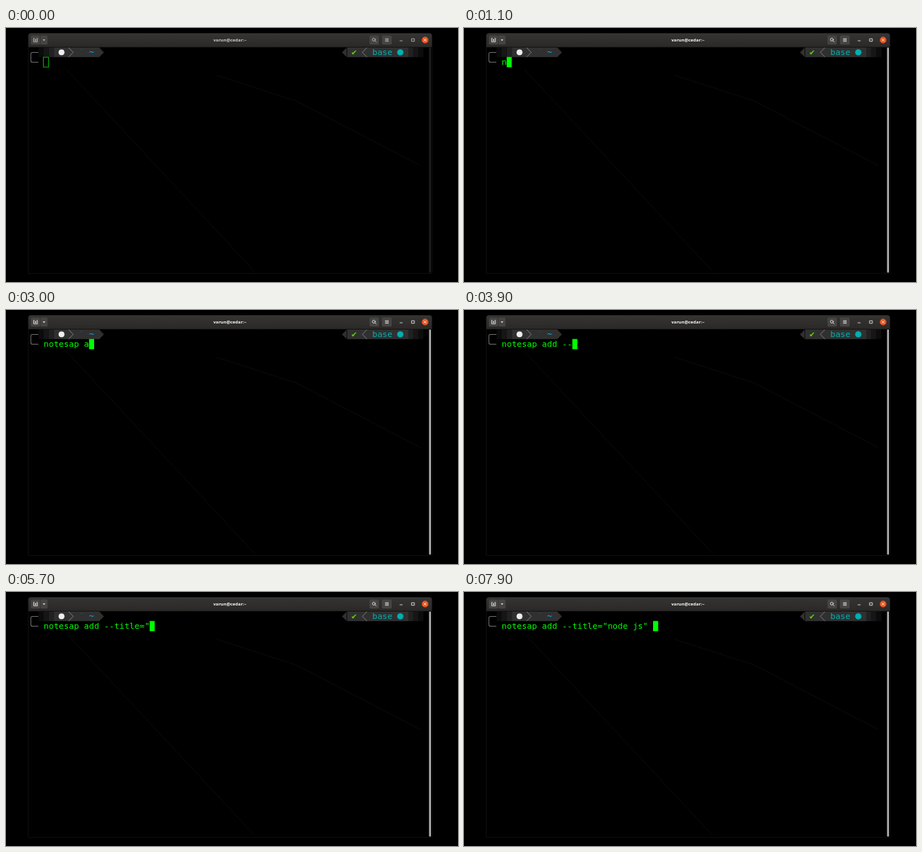
These frames come from a looping animation (600 by 338 pixels, 8 s). An HTML page:

```html
<!DOCTYPE html>
<html lang="en">
<head>
<meta charset="utf-8">
<title>Terminal</title>
<style>
  html, body { margin: 0; width: 100%; height: 100%; overflow: hidden; background: #000; }
  svg { display: block; width: 600px; height: 338px; }
  .mono { font: 11.13px "DejaVu Sans Mono", monospace; white-space: pre; }
  .title { font: bold 5.9px "Open Sans", "Noto Sans", sans-serif; }
  .line { fill: none; stroke-linecap: round; stroke-linejoin: round; }
</style>
</head>
<body>
<svg viewBox="0 0 600 338">
  <defs>
    <linearGradient id="bar" x2="0" y2="1">
      <stop stop-color="#353433"/>
      <stop offset="1" stop-color="#2a2928"/>
    </linearGradient>
  </defs>
  <rect width="600" height="338"/>

  <!-- window edge and faint backdrop lines -->
  <path class="line" d="M29.5 26V326.5H565.5V26" stroke="#0d0d0d"/>
  <path class="line" d="M80 55L200 184L330 324M280 63L385 97L550 183" stroke="#0b0b0b"/>

  <!-- header bar -->
  <path d="M29.5 25.5V10.5Q29.5 7 33 7H562Q565.5 7 565.5 10.5V25.5Z" fill="url(#bar)"/>
  <g fill="#454443">
    <rect x="33" y="10" width="12" height="12" rx="1.5"/>
    <rect x="45.6" y="10" width="9.6" height="12" rx="1.5"/>
    <rect x="482.5" y="10" width="12.5" height="12" rx="1.5"/>
    <rect x="499" y="10" width="13" height="12" rx="1.5"/>
  </g>
  <g id="icons" stroke="#eee" stroke-width=".8" class="line">
    <path d="M37.6 13.8H36.7V18.4H41.7V13.8H40.8M39.2 15V17.2M38.1 16.1H40.3"/>
    <path d="M48.8 15.2H52.2L50.5 17.3Z" fill="#eee" stroke="none"/>
    <circle cx="488.3" cy="15.5" r="1.9"/>
    <path d="M489.8 17L491.3 18.5"/>
    <path d="M503.6 14.3H507.6M503.6 16H507.6M503.6 17.7H507.6"/>
    <path d="M523 17H526"/>
    <rect x="538.7" y="14.3" width="3.4" height="3.4"/>
  </g>
  <circle cx="556.3" cy="16" r="4.4" fill="#e95420"/>
  <path class="line" d="M554.8 14.5L557.8 17.5M557.8 14.5L554.8 17.5" stroke="#fff" stroke-width=".8"/>
  <text id="title" class="title" x="297.3" y="18" text-anchor="middle">varun@cedar:~</text>

  <!-- prompt -->
  <path class="line" d="M42.5 32.5H35Q33 32.5 33 34.5V43.5Q33 45.5 35 45.5H42.5" stroke="#686868" stroke-width="1.1"/>
  <g id="fades"></g>
  <path d="M63.4 26H123.8L130 32.4L123.8 38.8H63.4Z" fill="#303030"/>
  <circle cx="73.7" cy="32.3" r="3.9" fill="#eee"/>
  <path class="line" d="M83.5 26.5L89.2 32.4L83.5 38.3" stroke="#808080" stroke-width=".9"/>
  <path class="line" d="M98.8 29L100.2 28L101.6 29" stroke="#17516a" stroke-width=".8"/>
  <text class="mono" x="110.2" y="36.2" fill="#00afff" font-weight="bold">~</text>

  <path d="M452.3 26V38.8L446 32.4Z" fill="#303030"/>
  <rect x="453" y="26" width="81" height="12.8" fill="#303030"/>
  <text class="mono" x="458.8" y="36.2" fill="#5fd700">✔</text>
  <path class="line" d="M478.8 26.5L473 32.4L478.8 38.3" stroke="#808080" stroke-width=".9"/>
  <text class="mono" x="486.2" y="36.2" fill="#00afaf">base</text>
  <circle cx="523.4" cy="32.4" r="4.2" fill="#00afaf"/>

  <!-- command line -->
  <text id="cmd" class="mono" x="50" y="49.3" fill="#0f0"></text>
  <rect id="cursor" y="39" height="13"/>
  <rect id="scroll" x="561.6" y="26" width="2.5" height="299.5" rx=".8"/>
</svg>
<script>
const LOOP = 8000, CELL = 6.7, LEFT = 50, FOCUS = 100, FADE = 200, BLINK = 600;
const $ = id => document.getElementById(id);

// [time, keys]; "<" deletes one character
const keys = [
  [1000, "n"], [1200, "o"], [1300, "t"], [1500, "e"], [1600, "s"], [1700, "a"],
  [1900, "p"], [2000, "p"], [2500, "<"], [2600, " "],
  [3000, "a"], [3200, "d"], [3400, "d"], [3500, " "], [3700, "-"], [3900, "-"],
  [4000, "t"], [4100, "i"], [4300, "t"], [4400, "le"], [5200, "="], [5700, "\""],
  [6000, "n"], [6100, "o"], [6500, "d"], [6700, "e "],
  [6900, "j"], [7100, "s"], [7700, "\""], [7900, " "]
];

function addFade(x, shade) {
  const r = document.createElementNS("http://www.w3.org/2000/svg", "rect");
  const box = { x, y: 26, width: CELL, height: 12.8, fill: `rgb(${shade},${shade},${shade})` };
  for (const k in box) r.setAttribute(k, box[k]);
  $("fades").append(r);
}
[12, 22, 33].forEach((shade, i) => {
  addFade(43.3 + i * CELL, shade);
  addFade(547.4 - i * CELL, shade);
});

function set(id, attrs) {
  for (const k in attrs) $(id).setAttribute(k, attrs[k]);
}

const gray = (from, to, p) => {
  const v = Math.round(from + (to - from) * p);
  return `rgb(${v},${v},${v})`;
};

function typed(t) {
  let text = "", last = -1;
  for (const [time, str] of keys) {
    if (time > t) break;
    text = str === "<" ? text.slice(0, -1) : text + str;
    last = time;
  }
  return { text, last };
}

function draw(t) {
  const { text, last } = typed(t);
  const focused = t >= FOCUS;
  const p = Math.min(1, Math.max(0, (t - FOCUS + 60) / FADE));
  const x = LEFT + text.length * CELL;
  const lit = last < 0 || (t - last) % (2 * BLINK) < BLINK;

  $("cmd").textContent = text;
  if (focused) {
    set("cursor", { x, y: 38.6, width: CELL, height: 13.6, fill: lit ? "#0f0" : "none", stroke: "none" });
  } else {
    set("cursor", { x: x - .4, y: 39, width: CELL + .3, height: 13, fill: "none", stroke: "#00b400" });
  }
  set("title", { fill: gray(200, 245, p) });
  set("icons", { opacity: .75 + .25 * p });
  set("scroll", { fill: gray(30, 178, p) });
}

function tick() {
  draw(performance.now() % LOOP);
  requestAnimationFrame(tick);
}
tick();
</script>
</body>
</html>
```
